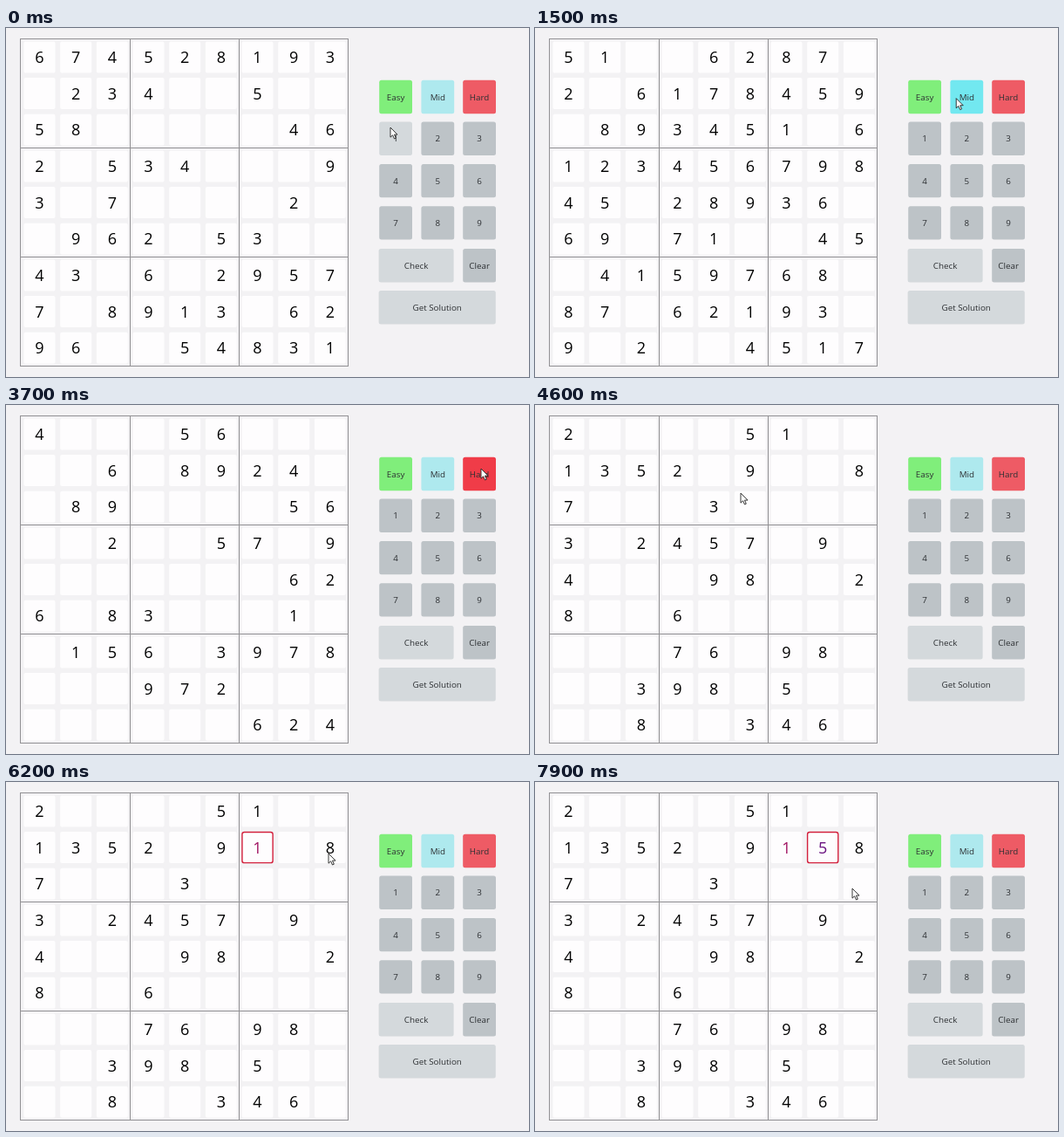
An HTML page that plays this animation: 600 px wide and 400 px high, repeating every 8000 ms.

```html
<!DOCTYPE html>
<html lang="en">
<head>
<meta charset="utf-8">
<title>Sudoku</title>
<style>
  html, body { margin: 0; width: 100%; height: 100%; overflow: hidden; background: #f3f2f4; }
  svg { display: block; width: 600px; height: 400px; }
  text { text-anchor: middle; font-family: "Open Sans", "Noto Sans", sans-serif; }
  .digit { font-size: 18px; fill: #000; }
  .label { font-size: 9.8px; fill: #2d3033; }
</style>
</head>
<body>
<svg id="stage" viewBox="0 0 600 400"></svg>
<script>
const LOOP = 8000, STEP = 100;
const stage = document.getElementById('stage');

function add(tag, attrs, text) {
  const el = document.createElementNS('http://www.w3.org/2000/svg', tag);
  for (const key in attrs) el.setAttribute(key, attrs[key]);
  if (text !== undefined) el.textContent = text;
  return stage.appendChild(el);
}

// Each puzzle: start time and nine rows, a dot for an empty cell
const puzzles = [
  [0, '674528193 .234..5.. 58.....46 2.534...9 3.7....2. .962.53.. 43.6.2957 7.8913.62 96..54831'],
  [500, '51..6287. 2.6178459 .893451.6 123456798 45.28936. 69.71..45 .4159768. 87.62193. 9.2..4517'],
  [1800, '21..9.365 34512..8. 6.93571.4 .2..4..78 4.67.12.3 .9..6345. 5...7.9.6 86.9.4.3. .74.35812'],
  [3300, '4...56... ..6.8924. .89....56 ..2..57.9 .......62 6.83...1. .156.3978 ...972... ......624'],
  [4000, '2....51.. 1352.9..8 7...3.... 3.2457.9. 4...98..2 8..6..... ...76.98. ..398.5.. ..8..346.']
].map(([time, rows]) => ({ time, digits: rows.replace(/ /g, '') }));

// Cells filled in by hand: selected, typed and deselected times
const entries = [
  { cell: 15, digit: '1', color: '#a01462', from: 5200, typed: 5900, to: 6700 },
  { cell: 16, digit: '5', color: '#6a1280', from: 6700, typed: 7400, to: LOOP }
];

// Pointer path: time, x, y
const path = [
  [0, 441, 114], [300, 452, 86], [600, 452, 84], [1200, 452, 84],
  [1600, 489, 80], [2200, 489, 79], [2700, 489, 79], [3100, 545, 74],
  [3700, 545, 73], [4100, 545, 73], [4600, 236, 101], [5000, 283, 78],
  [5300, 283, 78], [5700, 444, 124], [5900, 444, 124], [6200, 370, 82],
  [6500, 329, 78], [6800, 329, 78], [7100, 492, 172], [7400, 492, 172],
  [7900, 364, 122], [LOOP, 364, 122]
];

const center = i => ({ x: 38.5 + (i % 9) * 41.67, y: 33.4 + Math.floor(i / 9) * 41.67 });

const digits = [];
for (let i = 0; i < 81; i++) {
  const { x, y } = center(i);
  add('rect', { x: x - 18, y: y - 18, width: 36, height: 36, rx: 2, fill: '#fefdfe' });
  digits.push(add('text', { class: 'digit', x, y: y + 6.5 }));
}
const lines = [0, 1, 2, 3].map(i => {
  const x = [16.5, 142.5, 267.5, 392.5][i], y = [12.5, 137.5, 262.5, 387.5][i];
  return `M${x} 12V388M16 ${y}H393`;
}).join('');
add('path', { d: lines, fill: 'none', stroke: '#929194' });
const frame = add('rect', { width: 35.2, height: 35.2, rx: 2.5, fill: 'none', stroke: '#d3203c', 'stroke-width': 1.4 });

const buttons = [];
function button(label, x, y, w, fill, hover) {
  const h = 38.4;
  const rect = add('rect', { x, y, width: w, height: h, rx: 2.5, fill });
  add('text', { class: 'label', x: x + w / 2, y: y + h / 2 + 3.6 }, label);
  buttons.push({ rect, x, y, w, h, fill, hover });
}
const columns = [428.2, 476.4, 524.2];
const grey = '#bdc3c7', pale = '#d4d9dc';
button('Easy', columns[0], 59.8, 37.8, '#80ee7b', '#2dff25');
button('Mid', columns[1], 59.8, 37.8, '#aee9ee', '#72e8f0');
button('Hard', columns[2], 59.8, 37.8, '#ee5b65', '#f03c48');
for (let n = 0; n < 9; n++) {
  button(n + 1, columns[n % 3], 107.6 + Math.floor(n / 3) * 48.3, 37.8, grey, pale);
}
button('Check', 427.6, 253, 86, pale, pale);
button('Clear', columns[2], 253, 37.8, grey, pale);
button('Get Solution', 427.6, 301, 134.2, pale, pale);

const pointer = add('path', {
  d: 'M0 0V11.2L2.6 8.8L4.5 13L6.3 12.2L4.5 8.1H8Z',
  fill: '#fff', stroke: '#222', 'stroke-width': 0.9, 'stroke-linejoin': 'round'
});

function pointerAt(t) {
  const i = path.findIndex(p => p[0] > t);
  const [t0, x0, y0] = path[i - 1], [t1, x1, y1] = path[i];
  const u = (t - t0) / (t1 - t0), k = u * u * (3 - 2 * u);
  return { x: x0 + (x1 - x0) * k, y: y0 + (y1 - y0) * k };
}

function draw(t) {
  const puzzle = puzzles.filter(p => p.time <= t).pop();
  digits.forEach((el, i) => {
    el.textContent = puzzle.digits[i].replace('.', '');
    el.style.fill = '';
  });

  frame.style.display = 'none';
  for (const e of entries) {
    if (t >= e.typed) {
      digits[e.cell].textContent = e.digit;
      digits[e.cell].style.fill = e.color;
    }
    if (t >= e.from && t < e.to) {
      const { x, y } = center(e.cell);
      frame.setAttribute('x', x - 17.6);
      frame.setAttribute('y', y - 17.6);
      frame.style.display = '';
    }
  }

  const { x, y } = pointerAt(t);
  pointer.setAttribute('transform', `translate(${x} ${y})`);
  for (const b of buttons) {
    const over = x >= b.x && x <= b.x + b.w && y >= b.y && y <= b.y + b.h;
    b.rect.setAttribute('fill', over ? b.hover : b.fill);
  }
}

const start = performance.now();
let shown = -1;
function tick() {
  const t = Math.floor(((performance.now() - start) % LOOP) / STEP) * STEP;
  if (t !== shown) draw(shown = t);
  requestAnimationFrame(tick);
}
tick();
</script>
</body>
</html>
```
